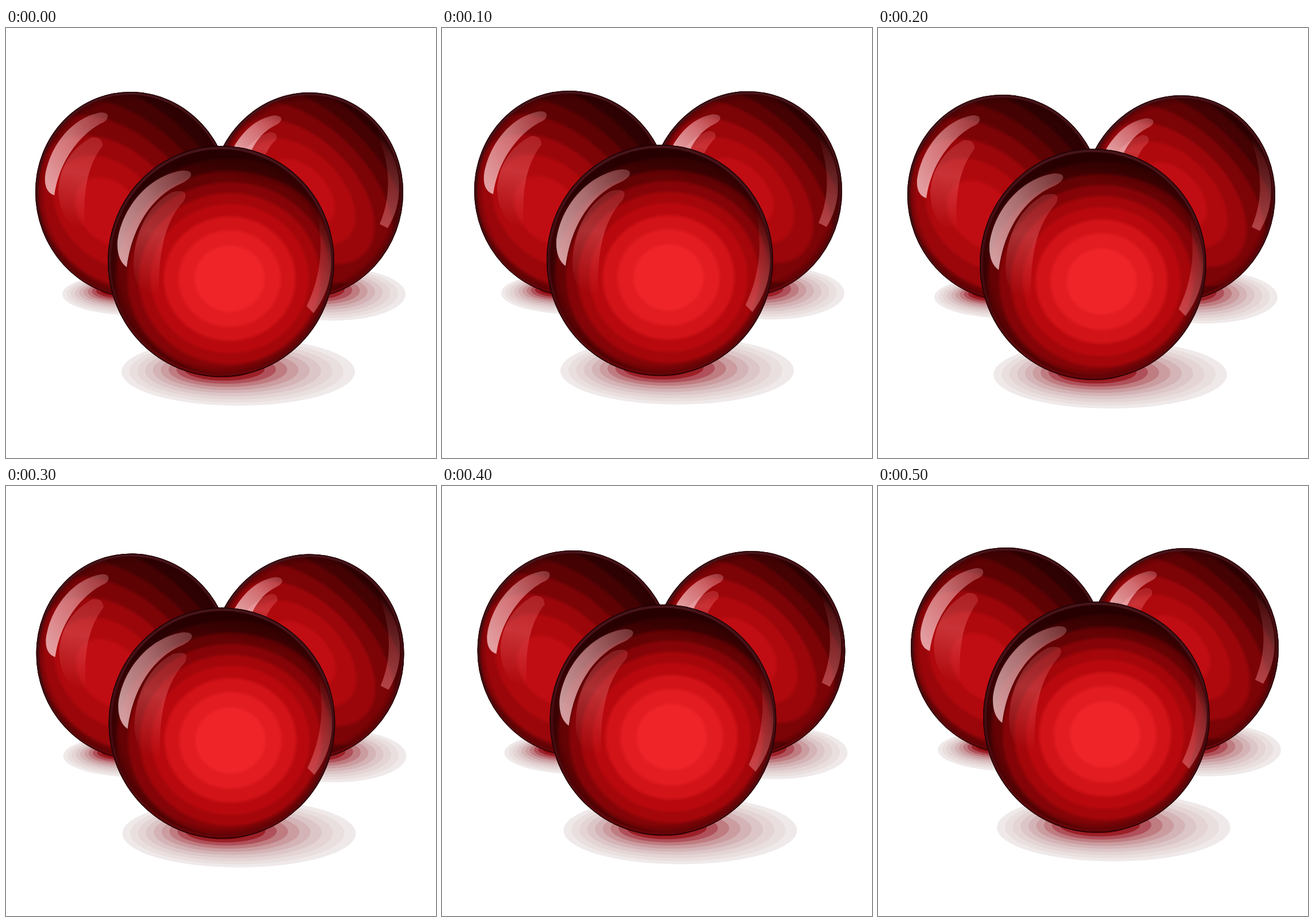
These frames come from a looping animation (748x748 px, 600 ms). An HTML page:

```html
<!DOCTYPE html>
<html lang="en">
<head>
<meta charset="utf-8">
<title>Shaking red spheres</title>
<style>
  html, body { margin: 0; width: 100%; height: 100%; overflow: hidden; background: #fff; }
  svg { display: block; width: 100vw; height: 100vh; }
</style>
</head>
<body>
<svg viewBox="0 0 748 748">
  <defs>
    <radialGradient id="frontFill" gradientUnits="userSpaceOnUse" cx="0" cy="0" r="240" gradientTransform="translate(389 436) scale(1.06 1)"/>
    <radialGradient id="leftFill" gradientUnits="userSpaceOnUse" cx="0" cy="0" r="260" gradientTransform="translate(180 320) rotate(45) scale(1.2 .86)"/>
    <radialGradient id="rightFill" href="#leftFill" gradientTransform="translate(515 285) rotate(45) scale(1.2 .72)"/>
    <radialGradient id="edge">
      <stop offset=".9" stop-color="#280002" stop-opacity="0"/>
      <stop offset=".96" stop-color="#280002" stop-opacity=".3"/>
      <stop offset="1" stop-color="#280002" stop-opacity=".7"/>
    </radialGradient>
    <linearGradient id="ring" x1="0" y1="0" x2="0" y2="1">
      <stop offset="0" stop-color="#46141a"/>
      <stop offset=".6" stop-color="#450a0e"/>
      <stop offset="1" stop-color="#660508"/>
    </linearGradient>
    <linearGradient id="shine" x1="0" y1=".8" x2="1" y2="0">
      <stop offset="0" stop-color="#ffd8da" stop-opacity=".72"/>
      <stop offset=".5" stop-color="#ffc4c8" stop-opacity=".55"/>
      <stop offset="1" stop-color="#ffb4b8" stop-opacity=".25"/>
    </linearGradient>
    <linearGradient id="glow" x1=".5" y1="0" x2=".4" y2="1">
      <stop offset="0" stop-color="#ff8a8e" stop-opacity=".2"/>
      <stop offset=".4" stop-color="#ff8a8e" stop-opacity=".32"/>
      <stop offset="1" stop-color="#ff8a8e" stop-opacity="0"/>
    </linearGradient>
    <linearGradient id="sideShine" x1="0" y1="0" x2="0" y2="1">
      <stop offset="0" stop-color="#ffa0a4" stop-opacity="0"/>
      <stop offset="1" stop-color="#ffa0a4" stop-opacity=".42"/>
    </linearGradient>
    <filter id="soft" x="-50%" y="-50%" width="200%" height="200%"><feGaussianBlur stdDeviation="7"/></filter>
    <clipPath id="frontClip"><ellipse cx="374" cy="406" rx="197" ry="201"/></clipPath>
    <path id="disc" d="M-1 0A1 1 0 0 1 1 0A1 1 0 0 1 -1 0"/>
    <clipPath id="leftClip"><use href="#disc" transform="matrix(170 5 0 179 221 290)"/></clipPath>
    <clipPath id="rightClip"><use href="#disc" transform="matrix(168 -5 0 179 523 291)"/></clipPath>
    <g id="rim">
      <circle r="1" fill="url(#edge)"/>
      <circle r=".983" fill="none" stroke="url(#ring)" stroke-width=".024"/>
      <circle r=".997" fill="none" stroke="#1c0305" stroke-width=".006"/>
    </g>
  </defs>

  <g id="scene">
    <g id="shadows"></g>

    <g id="left">
      <rect x="40" y="100" width="360" height="380" fill="url(#leftFill)" clip-path="url(#leftClip)"/>
      <use href="#rim" transform="matrix(170 5 0 179 221 290)"/>
      <path fill="url(#glow)" d="M91 280C94 235 122 203 150 190Q168 189 168 205C145 235 133 275 137 345C112 350 92 325 91 280Z"/>
      <path fill="url(#shine)" d="M84 291Q66 285 68 258C76 205 115 155 165 147Q178 146 177 155Q176 162 165 166C128 186 92 232 84 291Z"/>
    </g>

    <g id="right">
      <rect x="345" y="100" width="360" height="380" fill="url(#rightFill)" clip-path="url(#rightClip)"/>
      <use href="#rim" transform="matrix(168 -5 0 179 523 291)"/>
      <path fill="url(#glow)" d="M405 235C415 205 438 188 460 181Q474 182 470 194Q450 212 442 250Z"/>
      <path fill="url(#shine)" d="M393 213C410 180 436 157 466 152Q480 152 479 160Q477 165 469 169Q442 182 427 213Z"/>
      <path fill="url(#sideShine)" d="M645 180C692 230 694 300 664 348L650 341C672 290 668 235 645 180Z"/>
    </g>

    <g id="front">
      <ellipse cx="374" cy="406" rx="197" ry="201" fill="url(#frontFill)"/>
      <g clip-path="url(#frontClip)">
        <path fill="#200002" opacity=".4" filter="url(#soft)" d="M300 215Q520 180 570 350Q540 300 500 272Q440 245 300 237Z"/>
      </g>
      <use href="#rim" transform="translate(374 406) scale(197 201)"/>
      <path fill="url(#glow)" d="M222 415C222 355 248 308 288 286Q320 278 310 300C278 335 265 385 266 460C245 475 224 455 222 415Z"/>
      <path fill="url(#shine)" d="M210 416Q192 403 194 370C202 312 248 257 306 248Q323 247 322 256Q320 263 306 270C258 290 220 340 210 416Z"/>
      <path fill="url(#sideShine)" d="M540 318C575 375 576 442 535 496L523 484C549 430 553 375 540 318Z"/>
    </g>
  </g>
</svg>
<script>
  const scene = document.getElementById('scene');
  const shadows = document.getElementById('shadows');

  function add(parent, tag, attrs) {
    const el = document.createElementNS('http://www.w3.org/2000/svg', tag);
    for (const name in attrs) el.setAttribute(name, attrs[name]);
    parent.append(el);
  }

  // Gradient made of flat bands with slightly soft borders: outer end and colour of each.
  function bands(id, list) {
    const gradient = document.getElementById(id);
    let start = 0;
    for (const [end, color] of list) {
      add(gradient, 'stop', { offset: start + .014, 'stop-color': color });
      add(gradient, 'stop', { offset: end - .014, 'stop-color': color });
      start = end;
    }
  }
  bands('frontFill', [[.24, '#ee2429'], [.35, '#e21c21'], [.45, '#d21318'], [.54, '#b9090e'], [.62, '#a4060a'],
    [.7, '#860407'], [.78, '#640204'], [.87, '#420203'], [1, '#2a0102']]);
  bands('leftFill', [[.22, '#c00d13'], [.36, '#b0090d'], [.49, '#9a060a'], [.62, '#7c0306'], [.74, '#5e0204'],
    [.86, '#440203'], [1, '#2e0102']]);

  // Stepped ellipses shrinking from the outer shape towards the contact point.
  const tones = ['#f0e9e9', '#eadfdf', '#e4d4d4', '#dcc6c8', '#d4b4b6', '#cb9da0', '#bf7c81', '#b0505a', '#9c2028', '#8a060c'];
  function shadow(cx, cy, rx, ry, footX, footY) {
    tones.forEach((fill, i) => {
      const k = 1 - i * .082;
      const mix = i / tones.length;
      add(shadows, 'ellipse', { cx: cx + (footX - cx) * mix, cy: cy + (footY - cy) * mix, rx: rx * k, ry: ry * k, fill });
    });
  }
  shadow(228, 463, 130, 37, 195, 456);
  shadow(570, 463, 125, 46, 540, 453);
  shadow(404, 598, 203, 59, 374, 592);

  // The whole group jumps to a new place every 100 ms.
  const shakes = [[0, 0], [5, -2], [0, 5], [1.5, 6.5], [10.5, 1], [6, -4]];
  function draw() {
    const [x, y] = shakes[Math.floor(performance.now() % 600 / 100)];
    scene.setAttribute('transform', `translate(${x} ${y})`);
    requestAnimationFrame(draw);
  }
  draw();
</script>
</body>
</html>
```
